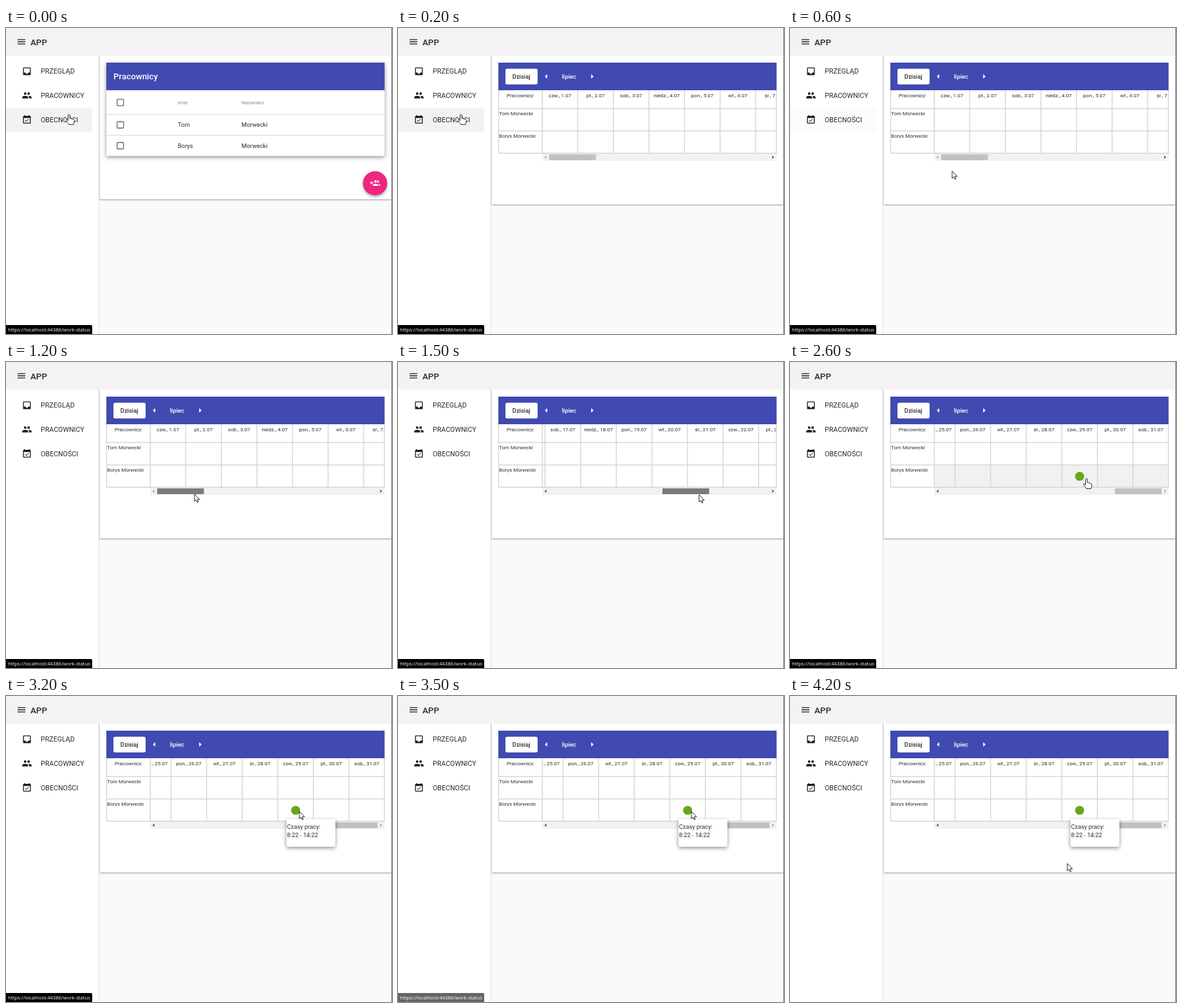
An HTML page that plays this animation: 600x477 px, repeating every 4400 ms.

```html
<!DOCTYPE html>
<html lang="pl">
<head>
<meta charset="utf-8">
<style>
  html, body { margin: 0; width: 100%; height: 100%; overflow: hidden; background: #faf9fb; }
  svg { display: block; }
  text { font-family: Roboto, sans-serif; font-size: 9.33px; fill: #2b2b2b; white-space: pre; }
  .medium { font-weight: 500; }
  .small { font-size: 8px; }
  .nav { font-size: 10.67px; }
  .title { font-size: 13.33px; font-weight: 500; }
  .mid { text-anchor: middle; }
  .white { fill: #fff; }
  .muted { fill: #858585; }
  .card { fill: #fff; filter: drop-shadow(0 1px 1px rgba(0,0,0,.4)); }
  .raised { fill: #fff; filter: drop-shadow(0 2px 3px rgba(0,0,0,.45)); }
  .line { fill: none; stroke: #d5d5d7; stroke-width: 1.4; }
  .box { fill: none; stroke: #666; stroke-width: 1.3; }
  .cursor { fill: #fff; stroke: #111; stroke-width: .9; stroke-linejoin: round; }
</style>
</head>
<body>
<svg id="stage" width="600" height="477" viewBox="0 0 600 477"></svg>
<script>
const LOOP = 4400, STEP = 100;
const DAY_WIDTH = 55.33, DAYS = 31, GRID_X = 224, GRID_WIDTH = 364.5;
const MAX_SCROLL = DAYS * DAY_WIDTH - GRID_WIDTH, THUMB_X = 235, THUMB_RANGE = 270;
const PEOPLE = [['Tom', 'Morwecki'], ['Borys', 'Morwecki']];
const WEEKDAYS = ['czw.', 'pt.', 'sob.', 'niedz.', 'pon.', 'wt.', 'śr.'];

const ICONS = {
  menu: 'M3 18h18v-2H3v2zm0-5h18v-2H3v2zm0-7v2h18V6H3z',
  inbox: 'M19 3H5a2 2 0 0 0-2 2v14a2 2 0 0 0 2 2h14a2 2 0 0 0 2-2V5a2 2 0 0 0-2-2zm0 12h-4a3 3 0 0 1-6 0H5V5h14z',
  people: 'M16 11a3 3 0 1 0 0-6 3 3 0 0 0 0 6zm-8 0a3 3 0 1 0 0-6 3 3 0 0 0 0 6zm0 2c-2.33 0-7 1.17-7 3.5V19h14v-2.5c0-2.33-4.67-3.5-7-3.5zm8 0l-1 .05c1.2.84 2 1.97 2 3.45V19h6v-2.5c0-2.33-4.67-3.5-7-3.5z',
  event: 'M16.5 11l-1-1-4.9 4.9-2.1-2.1-1.1 1 3.2 3.2zM19 3h-1V1h-2v2H8V1H6v2H5a2 2 0 0 0-2 2v14a2 2 0 0 0 2 2h14a2 2 0 0 0 2-2V5a2 2 0 0 0-2-2zm0 16H5V8h14z',
  groupAdd: 'M8 10H5V7H3v3H0v2h3v3h2v-3h3zm10 1a3 3 0 1 0-.9-5.86 5 5 0 0 1 0 5.72zm-5 0a3 3 0 1 0 0-6 3 3 0 0 0 0 6zm6.6 2.16c.85.73 1.4 1.66 1.4 2.84v2h3v-2c0-1.54-2.4-2.5-4.4-2.84zM13 13c-2 0-6 1-6 3v2h12v-2c0-2-4-3-6-3z'
};

const text = (x, y, content, cls = '') => `<text x="${x}" y="${y}" class="${cls}">${content}</text>`;
const rect = (x, y, w, h, attrs = '') => `<rect x="${x}" y="${y}" width="${w}" height="${h}" ${attrs}/>`;
const path = (d, attrs = '') => `<path d="${d}" ${attrs}/>`;
const icon = (name, x, y, color = '#1c1c1c') =>
  path(ICONS[name], `transform="translate(${x} ${y}) scale(.6667)" fill="${color}"`);
const checkbox = y => rect(172.7, y - 5, 10, 10, 'rx="1" class="box"');

const navItem = (name, label, y) => icon(name, 24.5, y - 8) + text(54, y + 3.8, label, 'nav');

const frame = rect(0, 43, 144, 434, 'fill="#fff"') + rect(144, 43, 1, 434, 'fill="#e3e3e4"')
  + rect(145.5, 40, 453.5, 227, 'id="card" class="card" rx="2"')
  + rect(0, 0, 600, 43, 'fill="#f3f3f4"')
  + icon('menu', 16, 13.5) + text(38, 26.5, 'APP', 'title')
  + path('M0 124.5H132a2 2 0 0 1 2 2V160a2 2 0 0 1-2 2H0Z', 'id="navHover"')
  + navItem('inbox', 'PRZEGLĄD', 67.5) + navItem('people', 'PRACOWNICY', 105)
  + navItem('event', 'OBECNOŚCI', 143);
const blueBar = rect(156, 54, 432.5, 43, 'fill="#404ab1"');

const employees = rect(156, 54, 432.5, 145.5, 'class="raised"') + blueBar
  + text(167, 80.3, 'Pracownicy', 'title white')
  + path('M156 135H588.5M156 167.3H588.5', 'class="line" style="stroke-width:1"')
  + checkbox(116.2) + text(267, 119, 'Imie', 'small muted') + text(366, 119, 'Nazwisko', 'small muted')
  + PEOPLE.map(([first, last], i) => {
      const y = 151 + i * 32.5;
      return checkbox(y) + text(267, y + 3.2, first) + text(366, y + 3.2, last);
    }).join('')
  + '<circle cx="573.7" cy="242" r="18.8" style="fill:#ee267d;filter:drop-shadow(0 2px 2px rgba(0,0,0,.4))"/>'
  + icon('groupAdd', 565.7, 234, '#fff');

let days = '';
for (let i = 0; i < DAYS; i++) {
  const x = i * DAY_WIDTH;
  days += path(`M${x} 0V98.5`, 'class="line"')
    + text(x + DAY_WIDTH / 2, 10.6, `${WEEKDAYS[i % 7]}, ${i + 1}.07`, 'small mid');
}
const schedule = blueBar
  + rect(167, 63.5, 50, 24.5, 'rx="2.7" fill="#fff"') + text(191.7, 78.8, 'Dzisiaj', 'medium mid')
  + path('M232 72v7l-3.6-3.5zM300.3 72v7l3.6-3.5z', 'fill="#fff"')
  + text(265.8, 78.8, 'lipiec', 'medium mid white')
  + text(190.5, 107.6, 'Pracownicy:', 'small mid')
  + PEOPLE.map((p, i) => text(157, 136 + i * 35, p.join(' '), 'small')).join('')
  + rect(GRID_X, 160.5, GRID_WIDTH, 35, 'id="rowHover" fill="#f1f1f2"')
  + `<svg x="${GRID_X}" y="97" width="${GRID_WIDTH}" height="98.5"><g id="days">${days}`
  + `<circle cx="${28.5 * DAY_WIDTH}" cy="81.3" r="7" fill="#65a917"/></g></svg>`
  + path('M156.5 97V195.3H588.2V97M156 125.5H588.5M156 160.5H588.5M224.2 97V195', 'class="line"')
  + rect(GRID_X, 196, GRID_WIDTH, 11, 'fill="#f1f1f2"')
  + rect(THUMB_X, 197, 72.6, 9, 'id="thumb"')
  + path('M230.5 199v5l-2.7-2.5z', 'id="leftArrow"') + path('M581.8 199v5l2.7-2.5z', 'id="rightArrow"')
  + '<g id="tip">' + rect(436, 192, 76, 43, 'rx="2.7" class="raised"')
  + text(436.7, 206.6, 'Czasy pracy:') + text(436.7, 220.2, '8:22 - 14:22') + '</g>';

const overlay = rect(599, 0, 1, 477, 'fill="#777"')
  + '<g id="status">' + path('M0 463H132a2 2 0 0 1 2 2V477H0Z')
  + '<text x="3.2" y="473" style="font:7.73px \'Open Sans\',sans-serif;fill:#fff">https://localhost:44386/work-status</text></g>'
  + path('M0 0V11.3L2.6 8.9 4.3 12.9 6 12.2 4.4 8.3H8Z', 'id="arrow" class="cursor"')
  + path('M-1.5 9V1.2a1.4 1.4 0 0 1 2.8 0V6q2-.6 2.5.7 2-.5 2.4.8 1.8-.3 1.9 1.2V11q0 2-1.2 3v1.5H-.5v-1q-2-2-4-5-.8-1.6.6-1.7 1.2 0 2.4 1.6Z',
      'id="hand" class="cursor"');

stage.innerHTML = `${frame}<g id="employees">${employees}</g><g id="schedule">${schedule}</g>${overlay}`;
const el = Object.fromEntries([...stage.querySelectorAll('[id]')].map(e => [e.id, e]));
const set = (name, attr, value) => el[name].setAttribute(attr, value);
const show = (name, opacity) => set(name, 'opacity', +opacity);

// Each key is [time, ...values]; values are interpolated linearly.
const POINTER = [[0, 98, 135], [200, 98, 135], [600, 252, 223], [1000, 293, 206], [1200, 293, 206],
  [1500, 468, 207], [1800, 554, 207], [1900, 561, 207], [2000, 561, 207], [2500, 461, 182],
  [2900, 461, 182], [3100, 456, 180], [3800, 456, 180], [4200, 431, 261], [LOOP, 431, 261]];
const SCROLL = [[0, 0], [1200, 0], [1500, .652], [1800, .97], [1900, 1], [LOOP, 1]];

function at(keys, t) {
  const i = keys.findIndex(k => k[0] > t);
  const [a, b] = [keys[i - 1], keys[i]], p = (t - a[0]) / (b[0] - a[0]);
  return a.slice(1).map((v, j) => v + (b[j + 1] - v) * p);
}

function draw(now) {
  const t = Math.floor(now % LOOP / STEP) * STEP;
  const [x, y] = at(POINTER, t), [scroll] = at(SCROLL, t);
  const onSchedule = t >= 200, onRow = t > 2000 && t < 2900 && y < 195;

  show('employees', !onSchedule);
  show('schedule', onSchedule);
  set('card', 'height', onSchedule ? 235 : 227);
  show('navHover', t < 900);
  set('navHover', 'fill', t < 400 ? '#f2f2f3' : '#fbfbfc');

  set('days', 'transform', `translate(${-scroll * MAX_SCROLL})`);
  set('thumb', 'x', THUMB_X + scroll * THUMB_RANGE);
  set('thumb', 'fill', t >= 1100 && t < 2000 ? '#7a7a7a' : '#c1c1c2');
  set('leftArrow', 'fill', scroll > 0 ? '#404040' : '#a3a3a3');
  set('rightArrow', 'fill', scroll < 1 ? '#404040' : '#a3a3a3');
  show('rowHover', onRow);

  show('tip', t < 2900 ? 0 : t < 3000 ? .5 : 1);
  show('status', t < 3500 ? 1 : t < 3600 ? .6 : 0);

  const pointing = t < 300 || onRow;
  show('hand', pointing);
  show('arrow', !pointing);
  for (const name of ['hand', 'arrow']) set(name, 'transform', `translate(${x} ${y})`);
  requestAnimationFrame(() => draw(performance.now()));
}
draw(0);
</script>
</body>
</html>
```
